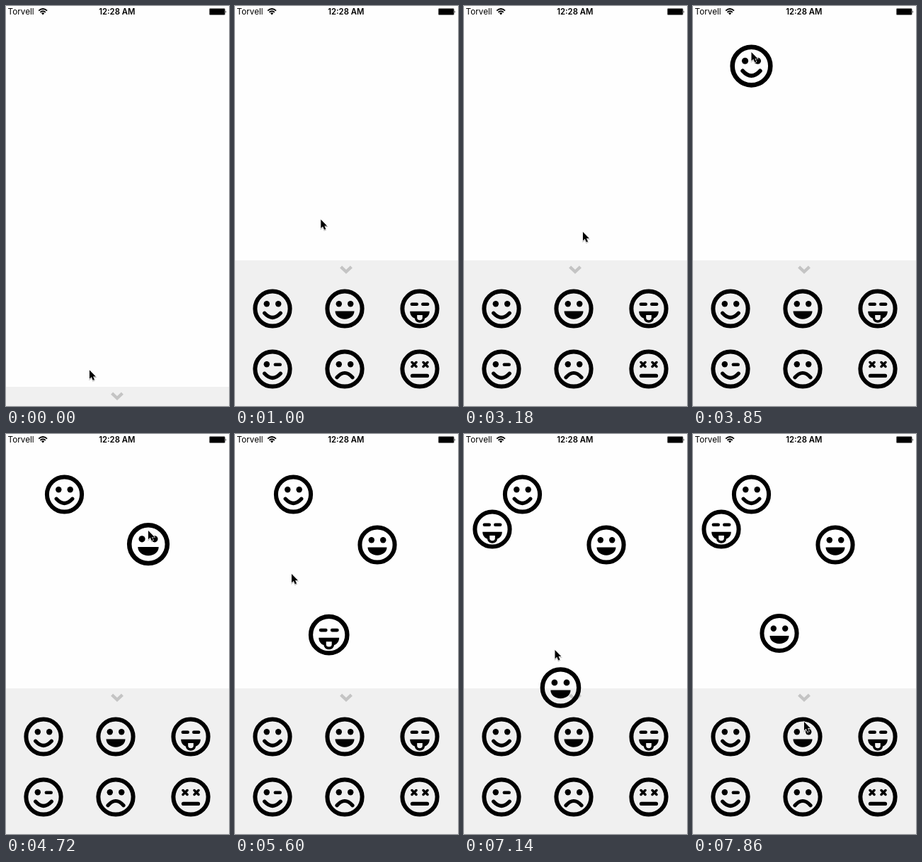
An HTML page for the animation above (8 s loop, 315 by 563 pixels).

```html
<!DOCTYPE html>
<html lang="en">
<head>
<meta charset="utf-8">
<title>Smiley tray</title>
<style>
  html, body { margin: 0; width: 100%; height: 100%; overflow: hidden; background: #fefefe; }
  svg { display: block; width: 100vw; height: 100vh; }
  text { font-family: Inter, "Liberation Sans", sans-serif; }
  .line { fill: none; stroke: #000; stroke-linecap: round; }
</style>
</head>
<body>
<svg viewBox="0 0 315 563">
  <defs>
    <circle id="ring" r="24.6" fill="none" stroke="#000" stroke-width="6"/>
    <circle id="dot" cy="-6.7" r="4.2"/>
    <path id="dash" class="line" d="M-3.5-6.3H3.5" stroke-width="4.4"/>
    <path id="cross" class="line" d="M-3-9.5L3-3.5M3-9.5L-3-3.5" stroke-width="3.5"/>
    <path id="smile" class="line" d="M-11.3 6.3Q0 18.7 11.3 6.3" stroke-width="5.3"/>
    <g id="dots"><use href="#dot" x="-8.2"/><use href="#dot" x="8.2"/></g>
    <g id="happy"><use href="#ring"/><use href="#dots"/><use href="#smile"/></g>
    <g id="grin">
      <use href="#ring"/><use href="#dots"/>
      <path d="M-13.5 3.5H13.5C13.5 10 7.5 14.7 0 14.7S-13.5 10-13.5 3.5Z"/>
    </g>
    <g id="tongue">
      <use href="#ring"/><use href="#dash" x="-7.7"/><use href="#dash" x="7.7"/>
      <path transform="translate(0 .8)" fill-rule="evenodd" d="M-13.8 3H13.8C13.8 8 11 11.5 7 13A7 6 0 0 1-7 13C-11 11.5-13.8 8-13.8 3ZM-3.8 8.3H3.8V12A3.8 3.4 0 0 1-3.8 12Z"/>
    </g>
    <g id="wink">
      <use href="#ring"/><use href="#dot" x="-8.2"/><use href="#dash" x="7.3"/><use href="#smile"/>
    </g>
    <g id="sad">
      <use href="#ring"/><use href="#dots"/>
      <path class="line" d="M-11 11.8Q0-.8 11 11.8" stroke-width="5.2"/>
    </g>
    <g id="dead">
      <use href="#ring"/><use href="#cross" x="-8"/><use href="#cross" x="8"/>
      <path class="line" d="M-10.5 9.4H10.5" stroke-width="5.2"/>
    </g>
  </defs>
  <rect width="315" height="563" fill="#fefefe"/>

  <text x="2.6" y="12.4" font-size="11.7">Torvell</text>
  <text x="156.8" y="12.4" font-size="11.3" font-weight="600" text-anchor="middle">12:28 AM</text>
  <g transform="translate(-.4 0)" fill="none" stroke="#000" stroke-width="1.9">
    <path d="M46.6 6.6Q52.5 1.4 58.4 6.6M48.8 8.9Q52.5 5.7 56.2 8.9"/>
    <path d="M50.4 10.2Q52.5 8.5 54.6 10.2L52.5 12.5Z" fill="#000" stroke="none"/>
  </g>
  <rect x="287.3" y="3.6" width="22" height="8.9" rx="1.2" stroke="#888" stroke-width=".6"/>
  <path d="M310.3 6.2Q312 8.1 310.3 10Z"/>

  <g id="tray">
    <rect width="315" height="210" fill="#f0f0f0"/>
    <path d="M149.6 9.2L157 16L164.4 9.2" fill="none" stroke="#c4c4c4" stroke-width="4.4"/>
    <use href="#happy" x="53" y="68"/>
    <use href="#grin" x="155" y="68"/>
    <use href="#tongue" x="261" y="68"/>
    <use href="#wink" x="53" y="153"/>
    <use href="#sad" x="155" y="153"/>
    <use href="#dead" x="261" y="153"/>
  </g>
  <g id="dropped"></g>
  <g id="cursor">
    <path transform="scale(.88)" d="M0 0V14L3.1 11.1L5.4 16.3L8 15.2L5.7 10.2H10Z" stroke="#fff" stroke-width="1.4"
      paint-order="stroke" style="filter:drop-shadow(.5px 1px .8px rgba(0,0,0,.35))"/>
  </g>
</svg>
<script>
const LOOP = 8000, STEP = 142, EARLY = 12;
const OPEN_Y = 358, TRAVEL = 178;             // tray
const HOME_Y = 426, GRIP = 20;                // smiley row, pointer height above a held smiley
const PULL = 450, HOLD = 480, LAG = 40, GROW = 0.09;
const $ = id => document.getElementById(id);

const clamp = u => Math.min(1, Math.max(0, u));
const smooth = u => { u = clamp(u); return u * u * (3 - 2 * u); };
const ramp = (t, a, b) => smooth((t - a) / (b - a));
const mix = (a, b, p) => a + (b - a) * p;

// The picture updates in steps during these spans and rests between them
const spans = [[0, 0], [150, 570], [1000, 1740], [2180, 3180], [3300, 4280],
  [4430, 5450], [5600, 6610], [6750, 7720], [7860, 7860]];

function stepTime(now) {
  const [a, b] = spans.filter(s => s[0] - EARLY <= now).pop();
  const count = Math.round((b - a) / STEP);
  if (!count) return a;
  const gap = (b - a) / count;
  return a + gap * Math.min(count, Math.floor((now - a + EARLY) / gap));
}

const drags = [
  { face: "happy", from: 53, x: 82.5, y: 85, grab: 3400 },
  { face: "grin", from: 155, x: 201, y: 156, grab: 4280 },
  { face: "tongue", from: 261, x: 40, y: 134, grab: 5430 },
  { face: "grin", from: 155, x: 122, y: 280.5, grab: 6860 }
];
for (const d of drags) {
  d.el = document.createElementNS("http://www.w3.org/2000/svg", "use");
  d.el.setAttribute("href", "#" + d.face);
  $("dropped").append(d.el);
}

// Pointer stops: time, x, y; each drag adds its grab and release
const stops = [
  [0, 118, 512.5], [570, 121, 286], [1000, 121.3, 300.5], [1590, 125, 536], [1740, 125, 536],
  [2320, 166.5, 545], [2900, 168, 315], [3180, 168, 318],
  [6480, 130, 461], [6750, 152, 422], [7860, 157, 405],
  ...drags.flatMap(d => [[d.grab, d.from, HOME_Y - GRIP], [d.grab + HOLD, d.x, d.y - GRIP]])
].sort((a, b) => a[0] - b[0]);

// Quick pull that swings slightly past its goal and settles
function pull(u) {
  u = clamp(u);
  return smooth(u / 0.6) + 0.03 * Math.sin(Math.PI * u) ** 2;
}

function dragPoint(d, t) {
  const u = (t - d.grab) / PULL;
  return [mix(d.from, d.x, pull(u * 1.12)), mix(HOME_Y, d.y, pull(u))];
}

function pointerAt(t) {
  const held = drags.find(d => t >= d.grab && t < d.grab + HOLD);
  if (held) {
    const [x, y] = dragPoint(held, t);
    return [x, y - GRIP];
  }
  const i = stops.findIndex(s => s[0] > t);
  if (i < 0) return stops[stops.length - 1].slice(1);
  const a = stops[i - 1], b = stops[i], p = ramp(t, a[0], b[0]);
  return [mix(a[1], b[1], p), mix(a[2], b[2], p)];
}

function place(el, x, y, scale = 1) {
  el.setAttribute("transform", `translate(${x} ${y}) scale(${scale})`);
}

function draw(time) {
  const t = stepTime(time % LOOP);
  const open = ramp(t, 100, 520) - ramp(t, 1150, 1590) + ramp(t, 2450, 2900);
  place($("tray"), 0, OPEN_Y + TRAVEL * (1 - open));
  place($("cursor"), ...pointerAt(t));
  for (const d of drags) {
    const age = t - d.grab;
    const lift = clamp(age / 340) * (1 - ramp(age, HOLD, HOLD + 100));
    d.el.style.display = age < 0 ? "none" : "";
    place(d.el, ...dragPoint(d, t - LAG), 1 + GROW * lift);
  }
}

const start = performance.now();
function loop() {
  draw(performance.now() - start);
  requestAnimationFrame(loop);
}
loop();
</script>
</body>
</html>
```
